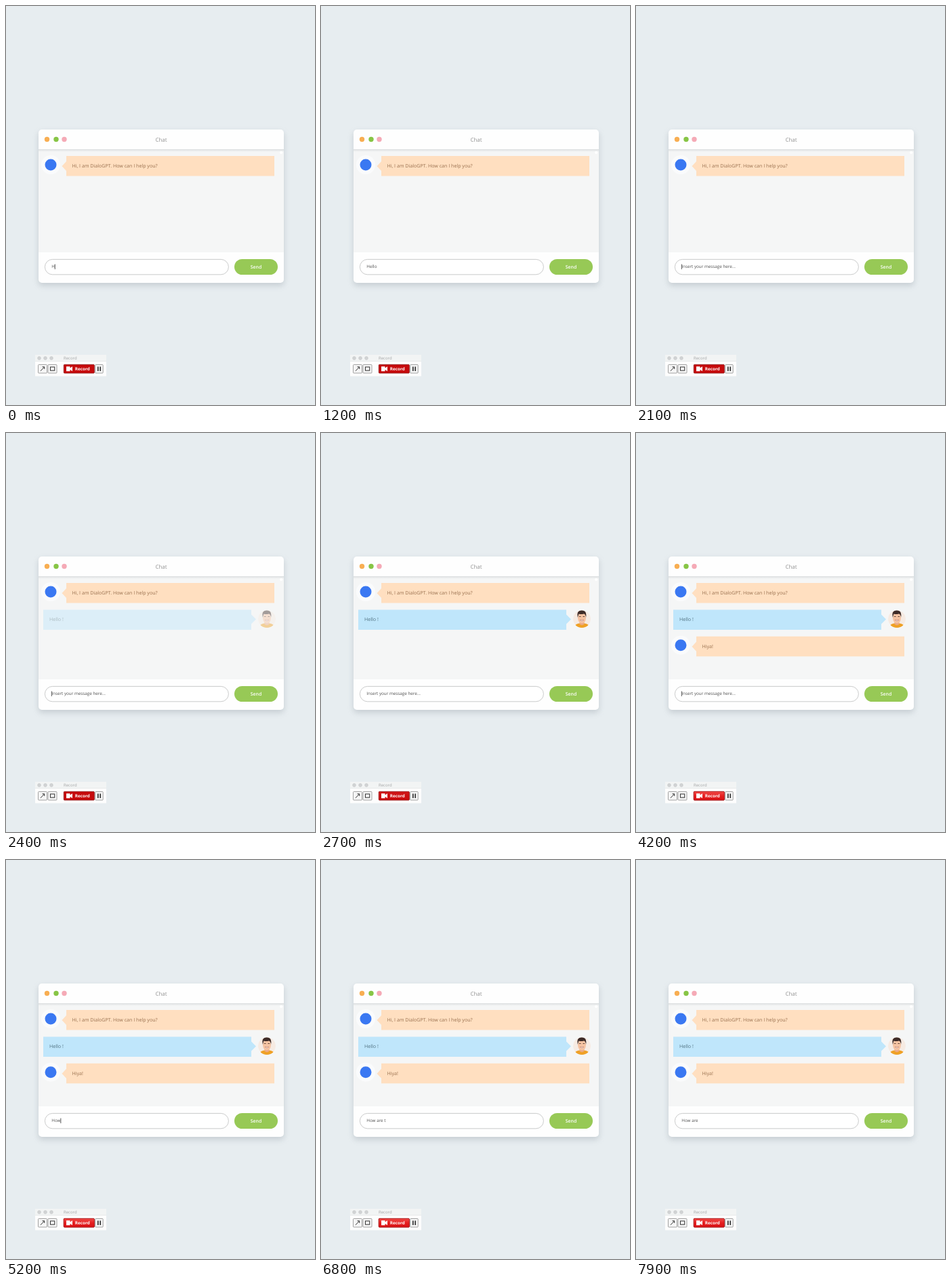
Animation, 456 px wide and 588 px high, one loop 8000 ms. Source, as an HTML page:

```html
<!DOCTYPE html>
<html lang="en">
<head>
<meta charset="utf-8">
<title>Chat</title>
<style>
  html, body { margin: 0; width: 100%; height: 100%; overflow: hidden; background: #e7edf0; }
  svg { display: block; }
  text { font-family: "Open Sans", sans-serif; text-rendering: geometricPrecision; white-space: pre; }
  .message { font-size: 7.1px; }
  .window { filter: drop-shadow(0 4px 4px rgba(90, 105, 115, .24)); }
</style>
</head>
<body>
<svg width="456" height="588" viewBox="0 0 456 588">
  <defs>
    <linearGradient id="edge" x2="0" y2="1">
      <stop stop-color="#dcdfe0"/><stop offset="1" stop-color="#f5f6f6"/>
    </linearGradient>
    <linearGradient id="glow" x2="0" y2="1">
      <stop stop-color="#f04a48"/><stop offset=".5" stop-color="#e62020"/><stop offset="1" stop-color="#d81014"/>
    </linearGradient>
    <clipPath id="round"><circle cx="385" cy="274" r="13"/></clipPath>
    <g id="bot">
      <circle cx="66" cy="234" r="14" fill="#fafbfc"/>
      <circle cx="66" cy="234" r="8.5" fill="#3a78f2"/>
    </g>
    <g id="user" clip-path="url(#round)">
      <circle cx="385" cy="274" r="13" fill="#f6ebe3"/>
      <path d="M373 288 Q374 281.500 381 280.500 H389 Q396 281.500 397 288Z" fill="#efa126"/>
      <path d="M381.500 278 V281.500 Q385 285 388.500 281.500 V278Z" fill="#eba983"/>
      <ellipse cx="385" cy="272.500" rx="6" ry="8" fill="#f5c3a2"/>
      <path d="M379 272 Q376.500 262 384 261.500 Q393 260.500 391 272 Q390.500 267 388 266.500 Q383 267.500 380.500 266.500 Q379.500 269 379 272Z" fill="#3e2c28"/>
      <path d="M381 270.500h2.500M386.500 270.500h2.500" stroke="#54392f" stroke-width=".9"/>
      <path d="M382 275.500 Q385 278.500 388 275.500Z" fill="#fff" stroke="#b56b56" stroke-width=".5"/>
    </g>
  </defs>

  <g class="window">
    <rect x="48" y="182" width="362" height="226" rx="5" fill="#fefefe"/>
  </g>
  <rect x="48" y="211" width="362" height="152" fill="#f5f6f6"/>
  <rect x="48" y="211" width="362" height="4" fill="url(#edge)"/>
  <circle cx="406" cy="216" r="2" fill="#fff"/>
  <circle cx="60.500" cy="196.500" r="3.700" fill="#f8ae52"/>
  <circle cx="74" cy="196.500" r="3.700" fill="#87c545"/>
  <circle cx="86" cy="196.500" r="3.700" fill="#f5aab6"/>
  <text x="229" y="200" font-size="8" text-anchor="middle" fill="#929292">Chat</text>

  <g id="messages"></g>

  <rect x="57.400" y="373.400" width="271" height="22.400" rx="11.200" fill="#fff" stroke="#bdbebe" stroke-width=".8"/>
  <text id="input" x="67.300" y="386.300" font-size="6.300" fill="#505050"></text>
  <path id="caret" d="M0 380.500v7.500" stroke="#333" stroke-width=".8"/>
  <rect x="337" y="373" width="64" height="23" rx="11.500" fill="#97c956"/>
  <text x="369" y="386.800" font-size="6.900" font-weight="600" text-anchor="middle" fill="#fff">Send</text>

  <rect x="43" y="514" width="105" height="31.500" fill="#fdfdfd"/>
  <rect x="43" y="514" width="105" height="9.500" fill="#f2f4f4"/>
  <path d="M43 523.500h105" stroke="#dfe2e3" stroke-width=".6"/>
  <g fill="#d2d4d5" stroke="#bfc1c2" stroke-width=".5">
    <circle cx="49" cy="519" r="2.400"/><circle cx="58" cy="519" r="2.400"/><circle cx="67" cy="519" r="2.400"/>
  </g>
  <text x="85" y="521.200" font-size="6" fill="#a2a4a5">Record</text>
  <g fill="#f5f5f5" stroke="#8d8d8d" stroke-width=".8">
    <rect x="47.500" y="528.500" width="13" height="12.500" rx="1"/>
    <rect x="62" y="528.500" width="13" height="12.500" rx="1"/>
    <rect x="131.700" y="528.500" width="11.500" height="12.500" rx="1"/>
  </g>
  <g fill="none" stroke="#333" stroke-width="1">
    <path d="M51 537.800l5.500-5.800M53.500 531.800h3.200v3.200"/>
    <rect x="65.500" y="532" width="6.200" height="5.200"/>
    <path d="M135.800 531.500v6.500M139.200 531.500v6.500" stroke-width="1.700"/>
  </g>
  <rect x="85.300" y="528.400" width="45" height="12.700" rx="1" fill="#c60a0c" stroke="#8e1416" stroke-width=".8"/>
  <rect id="bright" x="85.300" y="528.400" width="45" height="12.700" rx="1" fill="url(#glow)" stroke="#b52225" stroke-width=".8"/>
  <path d="M89 531.300h5.500v2.200l3.500-2.200v7l-3.500-2.200v2.200h-5.500z" fill="#fff"/>
  <text x="101.800" y="537.200" font-size="6.400" font-weight="700" fill="#fff">Record</text>
</svg>
<script>
  const LOOP = 8000;
  const BLINK = 500;
  const PLACEHOLDER = 'Insert your message here...';
  const $ = id => document.getElementById(id);

  const botMessage = (y, words) => `<g class="message" transform="translate(0 ${y})">
    <use href="#bot"/>
    <path d="M89 221H396V250.500H89V243L82.500 236L89 229Z" fill="#ffdfc0"/>
    <text x="97.500" y="238" fill="#98704e">${words}</text></g>`;
  const userMessage = words => `<g class="message">
    <use href="#user"/>
    <path d="M55 260.500H362V267.500L369 274.500L362 281.500V290H55Z" fill="#bfe6fb"/>
    <text x="64" y="277" fill="#4f7180">${words}</text></g>`;

  $('messages').innerHTML = botMessage(0, 'Hi, I am DialoGPT. How can I help you?')
    + userMessage('Hello !') + botMessage(78.7, 'Hiya!');
  const [, sent, reply] = $('messages').children;

  // [time, content] after each key press
  const keys = [
    [0, 'H'], [200, 'He'], [400, 'Hel'], [500, 'Hell'], [700, 'Hello'],
    [1700, 'Hello '], [1800, 'Hello !'], [2100, ''],
    [4900, 'H'], [5100, 'Ho'], [5200, 'How'], [5400, 'How '], [5500, 'How a'],
    [5700, 'How ar'], [5800, 'How are'], [6000, 'How are '], [6200, 'How are t'], [7300, 'How are ']
  ];

  const ramp = (t, start, length) => Math.min(1, Math.max(0, (t - start) / length));

  function draw(now) {
    const t = now % LOOP;
    const [pressed, value] = keys.findLast(key => key[0] <= t);
    const input = $('input');
    input.textContent = value || PLACEHOLDER;
    const caretX = 67.3 + (value ? input.getComputedTextLength() + .3 : 0);
    $('caret').setAttribute('transform', `translate(${caretX} 0)`);
    $('caret').style.opacity = Math.floor((t - pressed) / BLINK) % 2 ? 0 : 1;
    sent.style.opacity = ramp(t, 2180, 500);
    reply.style.opacity = ramp(t, 3620, 500);
    $('bright').style.opacity = ramp(t, 2500, 800);
    requestAnimationFrame(draw);
  }
  draw(0);
</script>
</body>
</html>
```
